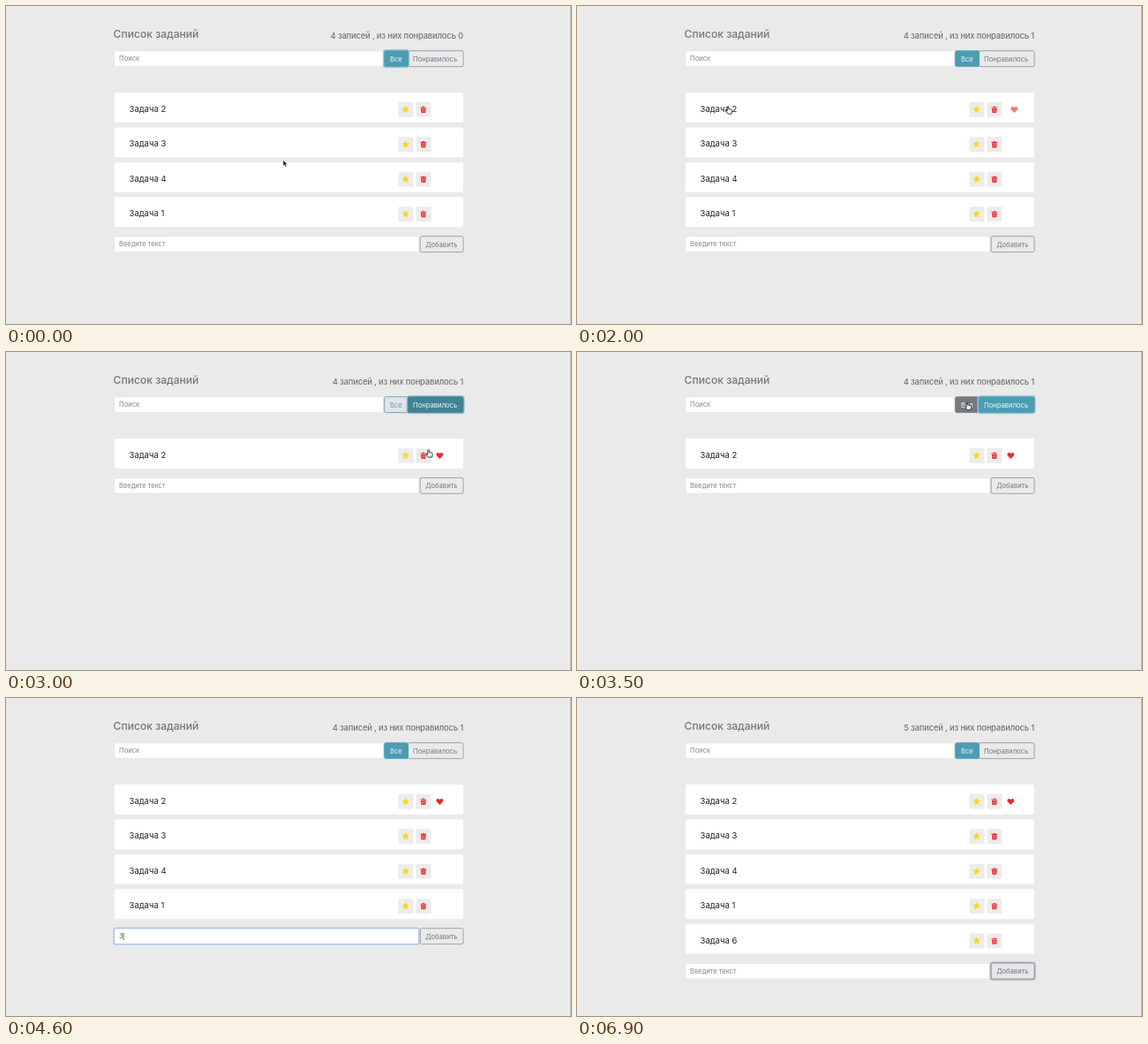
These frames come from a looping animation (640 by 360 pixels, 7 s). An HTML page:

```html
<!DOCTYPE html>
<html lang="ru">
<head>
<meta charset="utf-8">
<title>Список заданий</title>
<style>
  html, body { margin: 0; width: 100%; height: 100%; overflow: hidden; background: #eaeaea; }
  svg { display: block; width: 640px; height: 360px; }
  text { font-family: Inter, "Open Sans", sans-serif; white-space: pre; }
</style>
</head>
<body>
<svg id="stage" viewBox="0 0 640 360"></svg>
<script>
const LOOP = 7000, STEP = 100, PITCH = 39.45;
const stage = document.getElementById('stage');

// Moments of the demo, in ms
const LIKE = 1870, FILTER = 2800, ALL = 3600, FOCUS = 4000, TYPE = 4500, ADD = 6400;
const TYPE_GAP = 140, DRAFT = 'Задача 6';

// Pointer stops: time, x, y
const STOPS = [
  [0, 314, 174.5], [700, 314, 174.5], [1500, 171, 113.5], [2200, 171, 113.5],
  [2650, 484, 57], [2800, 484, 57], [3000, 478.5, 110.5], [3150, 478.5, 110.5],
  [3500, 442, 57], [3650, 442, 57], [3950, 179.5, 270], [5600, 179.5, 270],
  [6000, 505, 268.5], [7000, 505, 268.5]
];

const clamp = v => Math.max(0, Math.min(1, v));
const smooth = v => v * v * (3 - 2 * v);
const within = (t, a, b) => t >= a && t < b;

const rect = (x, y, w, h, fill, r = 2, more = '') =>
  `<rect x="${x}" y="${y}" width="${w}" height="${h}" rx="${r}" fill="${fill}" ${more}/>`;
const text = (x, y, size, fill, str, more = '') =>
  `<text x="${x}" y="${y}" font-size="${size}" fill="${fill}" ${more}>${str}</text>`;
const ring = (x, y, w, h, color) =>
  rect(x - .8, y - .8, w + 1.6, h + 1.6, 'none', 2.6, `stroke="${color}" stroke-width="1.8"`);

function star(cx, cy, r) {
  let pts = '';
  for (let i = 0; i < 10; i++) {
    const a = i * Math.PI / 5 - Math.PI / 2, d = i % 2 ? r * .5 : r;
    pts += `${(cx + d * Math.cos(a)).toFixed(2)},${(cy + d * Math.sin(a)).toFixed(2)} `;
  }
  return `<polygon points="${pts}" fill="#ffd51f" stroke="#ffd51f" stroke-width=".6" stroke-linejoin="round"/>`;
}

const trash = (x, y) => `<g transform="translate(${x} ${y})">
  <path d="M-3.3-2.9h2l.5-.8h1.6l.5.8h2v1.1h-6.6zM-2.9-1.4h5.8l-.3 4.3q-.1.8-.9.8h-3.4q-.8 0-.9-.8z" fill="#e8393c"/>
  <path d="M-1.2-.4v3M0-.4v3M1.2-.4v3" stroke="#f4a5a5" stroke-width=".45"/></g>`;

const heart = (x, y, alpha) =>
  `<path transform="translate(${x} ${y})" opacity="${alpha}" fill="#ee2a2a"
   d="M0 3.6L-3.4.1C-4.5-1.2-3.9-3.2-2.2-3.3C-1.2-3.4-.5-2.9 0-2.2C.5-2.9 1.2-3.4 2.2-3.3C3.9-3.2 4.5-1.2 3.4.1Z"/>`;

function button(x, y, w, h, label, tx, { fill = 'none', color = '#737a80', edge = '#858b90', glow }) {
  return (glow ? ring(x, y, w, h, glow) : '') +
    rect(x, y, w, h, fill, 1.8, `stroke="${edge}" stroke-width=".75"`) +
    text(tx, y + 11.8, 7.65, color, label);
}

function input(x, y, w, value, hint, focus) {
  return (focus ? `<g opacity="${focus}">${ring(x, y, w, 17.4, '#c3d3ef')}</g>` : '') +
    rect(x, y, w, 17.4, '#fff', 1.8, `stroke="${focus > .6 ? '#8ba9e6' : '#dfe1e4'}" stroke-width=".6"`) +
    text(128, y + 11.4, 7.6, value ? '#5d6268' : '#82878c', value || hint);
}

function row(name, i, like) {
  const y = 98 + i * PITCH, cy = y + 19.3;
  return rect(122.8, y, 395.2, 33.8, '#fff') +
    text(139.6, y + 21.9, 9.5, '#252525', name) +
    rect(444.5, y + 10.8, 17, 17, '#ececec', 1.5) + star(452.7, cy - .1, 3.9) +
    rect(464.5, y + 10.8, 17, 17, '#ececec', 1.5) + trash(472.8, cy) +
    (like ? heart(502 - 10.7 * like, cy + .1, like) : '');
}

function filters(t) {
  const liked = within(t, FILTER, ALL);
  const on = { fill: '#4c9cb3', color: '#eaf7fa', edge: '#4c9cb3' };
  const hover = { fill: '#737a81', color: '#fff', edge: '#737a81' };
  const glow = '#a3cbd5';
  let all = on, fav = {};
  if (liked) {
    const fresh = t < FILTER + 300;
    all = fresh ? { fill: '#dfe5eb', color: '#7b93a8', edge: '#6d8797' } : {};
    fav = { ...on, glow };
    if (fresh) fav.fill = fav.edge = '#418293';
    if (t >= 3450) all = hover;
  } else {
    if (t < 1800 || within(t, ALL, FOCUS + 100)) all = { ...on, glow };
    if (within(t, 2600, FILTER)) fav = hover;
  }
  const a = button(428.6, 50.7, 27, 17.9, 'Все', 435, all);
  const b = button(455.2, 50.7, 62.8, 17.9, 'Понравилось', 461, fav);
  return liked ? a + b : b + a;
}

function pointer(t) {
  if (within(t, 4300, 5600) || t >= ADD + 100) return '';
  const i = STOPS.findIndex((s, n) => n && t < s[0]);
  const [t0, x0, y0] = STOPS[i - 1], [t1, x1, y1] = STOPS[i];
  const k = smooth(clamp((t - t0) / (t1 - t0)));
  const x = x0 + (x1 - x0) * k, y = y0 + (y1 - y0) * k;
  const at = `transform="translate(${x.toFixed(2)} ${y.toFixed(2)})"`;
  const overText = y > 261 && y < 279 && x > 123 && x < 467;
  const overHand = (x > 428 && x < 518 && y > 50 && y < 69) || (x > 469 && y > 260) ||
    (y > 108 && y < 127 && ((x > 139 && x < 182) || (x > 444 && x < 482)));
  if (overText)
    return `<path ${at} d="M-1.5-3.6Q0-3.6 0-2.6Q0-3.6 1.5-3.6M0-2.8V2.8M-1.5 3.6Q0 3.6 0 2.6Q0 3.6 1.5 3.6M-.8.8H.8" fill="none" stroke="#222" stroke-width=".85"/>`;
  if (overHand)
    return `<path ${at} d="M-.7.6Q0-.2.7.6V3L4 3.7Q4.8 4 4.6 5.2L4 8.6H.1L-2.3 5.5Q-2.6 4.4-1.6 4.6L-.7 5.3Z" fill="#fff" stroke="#1c1c1c" stroke-width=".85" stroke-linejoin="round"/>`;
  return `<path ${at} d="M0 0V6.7L1.5 5.3L2.6 7.8L3.8 7.3L2.7 4.9H4.8Z" fill="#111" stroke="#fff" stroke-width=".5"/>`;
}

function form(t, count) {
  const y = 261 + (count - 4) * PITCH, added = t >= ADD;
  const typed = added || t < TYPE ? '' : DRAFT.slice(0, 1 + Math.floor((t - TYPE) / TYPE_GAP));
  const focused = within(t, FOCUS, ADD);
  const focus = focused ? clamp((t - FOCUS) / 150) : 0;
  let look = {};
  if (added) look = { fill: '#e5e6e8', glow: '#b4b8bb' };
  else if (t >= 6000) look = { fill: '#6f757c', color: '#fff', edge: '#6f757c' };
  return input(122.8, y, 344.6, typed, 'Введите текст', focus) +
    button(469.2, y - .3, 48.8, 17.9, 'Добавить', 475.2, look) +
    (focused ? `<path id="caret" d="M128 ${y + 4.6}v8.6" stroke="#444" stroke-width=".8"/>` : '');
}

function draw(t) {
  const like = t < LIKE ? 0 : Math.sin(clamp((t - LIKE) / 300) * Math.PI / 2);
  const total = t >= ADD ? 5 : 4;
  const names = [2, 3, 4, 1, 6].slice(0, within(t, FILTER, ALL) ? 1 : total);
  stage.innerHTML =
    rect(0, 0, 640, 360, '#eaeaea', 0) +
    text(121.6, 36, 12.1, '#777', 'Список заданий', 'font-weight="500"') +
    text(518, 37.2, 9.4, '#747474', `${total} записей , из них понравилось ${like ? 1 : 0}`,
      'font-weight="500" text-anchor="end" letter-spacing="-.16"') +
    input(122.8, 51, 304.4, '', 'Поиск', 0) +
    filters(t) +
    names.map((n, i) => row('Задача ' + n, i, i ? 0 : like)).join('') +
    form(t, names.length) +
    rect(639.3, 0, .7, 360, '#a5a5a5', 0) +
    pointer(t);

  // The caret follows the typed text
  const caret = document.getElementById('caret');
  if (caret && t >= TYPE) {
    const field = caret.previousElementSibling.previousElementSibling.previousElementSibling;
    caret.setAttribute('transform', `translate(${field.getComputedTextLength() + .4} 0)`);
  }
}

let last = -1;
function tick() {
  const t = Math.floor(performance.now() % LOOP / STEP) * STEP;
  if (t !== last) draw(last = t);
  requestAnimationFrame(tick);
}
tick();
</script>
</body>
</html>
```
